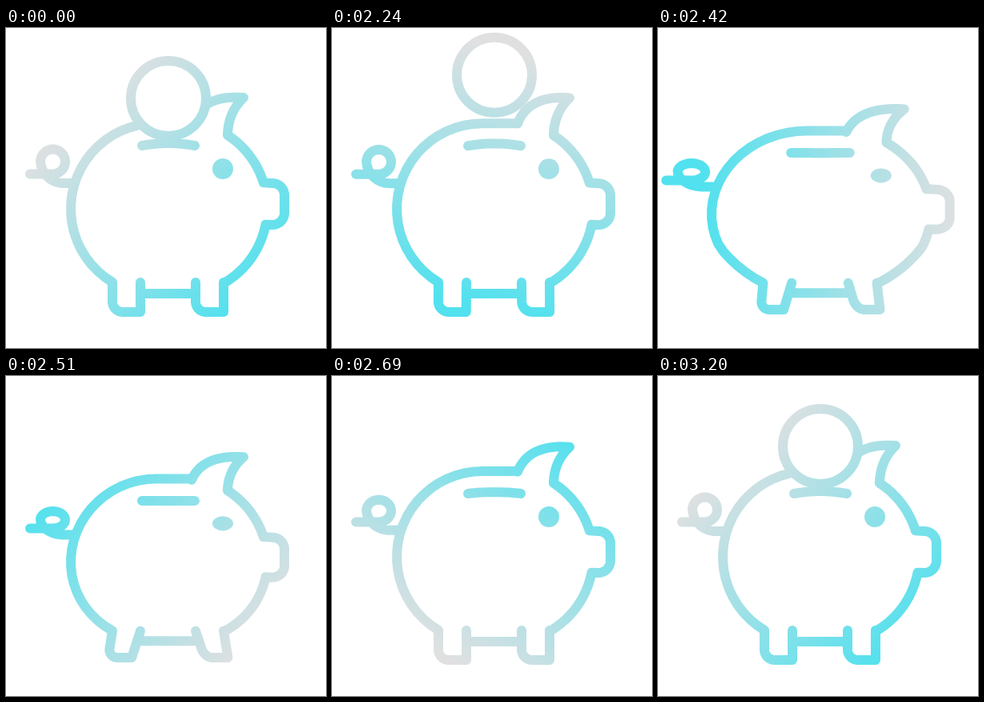
Animation of 400 by 400 pixels, one loop 3.23 s. Source, as an HTML page with a canvas:

```html
<!DOCTYPE html>
<html lang="en">
<head>
<meta charset="utf-8">
<title>Piggy bank</title>
<style>
html, body { margin: 0; width: 100%; height: 100%; overflow: hidden; background: #fff; }
canvas { display: block; width: 100vw; height: 100vh; }
</style>
</head>
<body>
<canvas id="stage" width="400" height="400"></canvas>
<script>
const ctx = document.getElementById('stage').getContext('2d');
const LOOP = 3230, STEP = 30, PHASE = 20, LINE = 12, MIDDLE = 203;

const mix = (a, b, k) => a + (b - a) * k;
const progress = (t, from, to) => Math.min(1, Math.max(0, (t - from) / (to - from)));
const smooth = u => u * u * (3 - 2 * u);
const sample = (count, at) => Array.from({ length: count + 1 }, (_, i) => at(i / count));

function arc(cx, cy, r, from, to) {
  return sample(24, u => {
    const a = mix(from, to, u) * Math.PI / 180;
    return [cx + r * Math.cos(a), cy + r * Math.sin(a)];
  });
}

function curve(a, b, c) {
  return sample(16, u => [0, 1].map(i => mix(mix(a[i], b[i], u), mix(b[i], c[i], u), u)));
}

const leg = x => [[x + 35, 318], [x + 35, 355], ...arc(x + 13, 342, 13, 90, 180), [x, 318]];

// Soft parts flatten toward their base line and recover late.
const parts = {
  tail: {
    points: [[82, 194], ...arc(72, 165, 29, 90, 180), ...arc(58.5, 167, 15.5, 180, 450), [30, 182.5]],
    base: 182, softness: .28
  },
  back: { points: [...leg(133), ...arc(188, 226, 107, 121, 270), [232, 119]] },
  ear: {
    points: [...curve([232, 119], [246, 83], [297, 87]), ...curve([297, 87], [278, 105], [277, 133])],
    base: 133, softness: .1
  },
  front: {
    points: [
      ...arc(218, 225, 108.5, -57, -17),
      ...arc(333, 209, 15, -90, 0), ...arc(333, 231, 15, 0, 90),
      ...arc(218, 225, 108.5, 11, 60), ...leg(237)
    ]
  },
  belly: { points: [[174, 332], [237, 332]] },
  slot: { points: curve([170, 147], [MIDDLE, 141], [236, 147]), base: 147, softness: 1 }
};

function pigPose(t) {
  const hit = smooth(progress(t, 2230, 2330));
  return {
    squash: hit * (1 - smooth(progress(t, 2500, 2690))),
    lag: hit * (1 - smooth(progress(t, 2520, 2810))),
    stretch: .125 * Math.sin(Math.PI * progress(t, 2290, 2510)) ** 2
  };
}

// The body sinks and widens, the legs splay and the soles stay down.
function warp([x, y], pose, { base = 0, softness = 0 }) {
  const drop = 10 - 13 * (y / 355) ** 3;
  const splay = 380 / (x - MIDDLE) * progress(y, 318, 355);
  return [
    x + pose.squash * splay + pose.stretch * (x - MIDDLE) * progress(y, 330, 270),
    y + pose.squash * drop + pose.lag * softness * (base - y)
  ];
}

function drawPart(part, pose) {
  ctx.beginPath();
  for (const point of part.points) ctx.lineTo(...warp(point, pose, part));
  ctx.stroke();
}

function drawEye(pose) {
  ctx.beginPath();
  ctx.ellipse(...warp([271, 176], pose, {}), 13, 13 - 4 * pose.squash, 0, 0, Math.PI * 2);
  ctx.fill();
}

function coinShape(t) {
  const radius = 47, mid = 88;
  if (t < 2600) {
    // Hop up, fall, then squeeze through the slot.
    const hop = -33 * Math.max(0, 1 - ((t - 2180) / 176) ** 2);
    const sink = progress(t, 2300, 2420), mouth = 154;
    return {
      top: mix(mid - radius + hop, mouth, sink ** 2),
      mid: mix(mid + hop, mouth, sink ** 2),
      bottom: mix(mid + radius + hop, mouth, Math.sqrt(sink)),
      half: radius * (1 - sink ** 3)
    };
  }
  // Grow out of the slot, overshoot and settle.
  const r = radius * Math.sin(Math.PI / 2 * progress(t, 2720, 2970));
  const u = progress(t, 2930, 3200);
  const bottom = mid + radius - 34 * (1 - u) * Math.sin(Math.PI * u ** .7);
  return { top: bottom - 2 * r, mid: bottom - r, bottom, half: r };
}

function drawCoin({ top, mid, bottom, half }, paint) {
  if (half < 2) return;
  ctx.beginPath();
  for (const [a, end] of [[0, bottom], [Math.PI, top]]) {
    ctx.ellipse(MIDDLE, mid, half, Math.abs(end - mid), 0, a, a + Math.PI);
  }
  ctx.closePath();
  ctx.fillStyle = '#fff';
  ctx.fill();
  ctx.fillStyle = paint;
  ctx.lineWidth = Math.min(LINE, half);
  ctx.stroke();
  ctx.lineWidth = LINE;
}

// The light makes one turn around the pig.
function makePaint(t) {
  const p = progress(t, 2030, 3080), u = p ** .9;
  const turn = mix(u, (1 - Math.cos(Math.PI * u)) / 2, .7);
  const a = Math.PI * (.25 + 2 * turn), c = Math.cos(a), s = Math.sin(a);
  const shift = 30 * (1 - p) * Math.sin(2 * Math.PI * p), reach = 160;
  const x = MIDDLE - c * shift, y = 211 - s * shift;
  const paint = ctx.createLinearGradient(
    x - c * reach, y - s * reach, x + c * reach, y + s * reach);
  paint.addColorStop(0, '#e0e0e1');
  paint.addColorStop(1, '#52e1ee');
  return paint;
}

function draw(now) {
  const t = Math.floor((now % LOOP - PHASE) / STEP) * STEP + PHASE;
  const pose = pigPose(t), paint = makePaint(t);
  const { slot, ...body } = parts;
  ctx.fillStyle = '#fff';
  ctx.fillRect(0, 0, 400, 400);
  ctx.fillStyle = ctx.strokeStyle = paint;
  ctx.lineWidth = LINE;
  ctx.lineCap = ctx.lineJoin = 'round';
  for (const part of Object.values(body)) drawPart(part, pose);
  drawEye(pose);
  drawCoin(coinShape(t), paint);
  drawPart(slot, pose);
  requestAnimationFrame(draw);
}

draw(performance.now());
</script>
</body>
</html>
```
